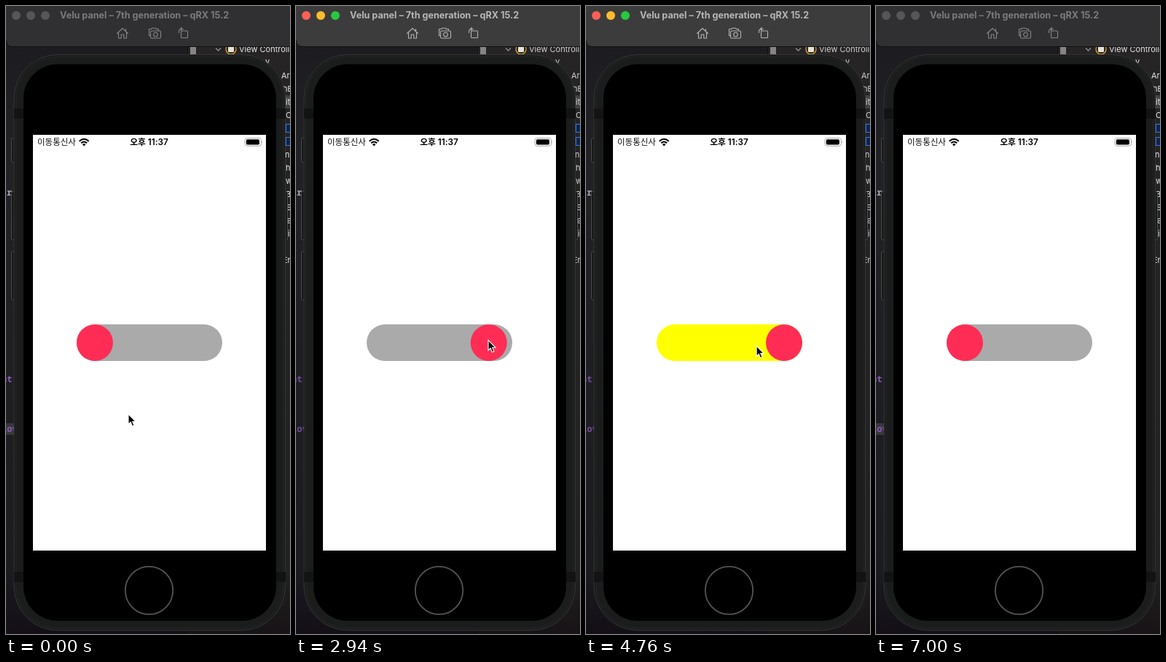
Recreate the animation shown at these times as an HTML page. Size 390 by 858 pixels, loop 7070 ms.

```html
<!DOCTYPE html>
<html lang="ko">
<head>
<meta charset="utf-8">
<style>
  html, body { margin: 0; width: 100%; height: 100%; overflow: hidden; background: #000; }
  svg { display: block; width: 390px; height: 858px; }
  text { font-family: Inter, "Noto Sans CJK KR", sans-serif; }
  .code { font: 600 12px "Noto Sans Mono", monospace; fill: #75499b; }
  #side { font-size: 11px; fill: #d2d1d1; }
  #bar { fill: #3c3c3c; }
  #title { font-size: 12.6px; font-weight: 700; fill: #b7b7b7; }
  #icons { fill: none; stroke: #b2b2b2; stroke-width: 1.1; stroke-linejoin: round; stroke-linecap: round; }
  .idle #bar { fill: #303032; }
  .idle #title { fill: #7b7b7d; }
  .idle #icons { stroke: #858587; }
  .idle #lights circle { fill: #565658; }
  .idle #side { fill: #e8e7e7; }
  .idle .code { fill: #8d5bb6; }
  .idle #caret { fill: #38383e; }
</style>
</head>
<body>
<svg id="stage" viewBox="0 0 390 858">
  <defs>
    <linearGradient id="editor" x2="0" y2="1">
      <stop stop-color="#1b1b1f"/><stop offset=".25" stop-color="#222226"/>
      <stop offset=".9" stop-color="#1b1b20"/><stop offset="1" stop-color="#140f17"/>
    </linearGradient>
    <linearGradient id="panel" x2="0" y2="1">
      <stop stop-color="#262424"/><stop offset=".9" stop-color="#232121"/><stop offset="1" stop-color="#171316"/>
    </linearGradient>
  </defs>

  <!-- windows behind the phone -->
  <rect width="249" height="858" fill="url(#editor)"/>
  <rect x="249" width="141" height="858" fill="url(#panel)"/>
  <path d="M249.5 55V858" stroke="#111"/>
  <rect x="253" y="55" width="8" height="11" fill="#858585"/>
  <rect x="376" y="122" width="14" height="18" fill="#444343"/>
  <path d="M288 57.500l3.500 3.500 3.500-3.500" fill="none" stroke="#929292" stroke-width="1.300"/>
  <circle cx="309" cy="59" r="7" fill="#2c2618" stroke="#d4a136" stroke-width="1.300"/>
  <rect x="305" y="55" width="8" height="8" rx="1" fill="#e5e2db"/>
  <g fill="#10244c" stroke="#3a78db">
    <rect x="384.500" y="161.500" width="10" height="11"/>
    <rect x="384.500" y="179.500" width="10" height="11"/>
  </g>
  <g id="side"></g>
  <rect id="caret" y="570" width="12" height="16" fill="none"/>
  <text class="code" x="1" y="259" style="fill:#aaa0b4">r</text>
  <text class="code" x="-6" y="514">nt</text>
  <text class="code" x="-6" y="582">lov</text>

  <!-- simulator title bar -->
  <path id="bar" d="M0 0H390V55H8Q0 55 0 47Z"/>
  <path d="M390 55.500H8Q.5 55 .5 47" fill="none" stroke="#111"/>
  <g id="lights">
    <circle cx="14" cy="13" r="6" fill="#ff5f57"/>
    <circle cx="34" cy="13" r="6" fill="#febc2e"/>
    <circle cx="54" cy="13" r="6" fill="#28c840"/>
  </g>
  <text id="title" x="74" y="17.300">Velu panel – 7th generation – qRX 15.2</text>
  <g id="icons">
    <path d="M152.500 37.500L160 30.500l7.500 7M154.500 36v8h3.700v-5h3.600v5h3.700v-8M164.500 34v-2.500"/>
    <path d="M198 40.500h-1.500v-9h3l1-1.300h5l1 1.300h3V33"/>
    <rect x="198.500" y="34" width="14" height="10" rx="1.500"/>
    <circle cx="205.500" cy="39" r="2.800"/>
    <rect x="240.500" y="34" width="9" height="9.500" rx="1"/>
    <path d="M237.500 36.500v-2q0-3 3-3h3M241.500 29.500l-2 2 2 2"/>
  </g>

  <!-- phone -->
  <g fill="#17181a" stroke="#4b4b4b">
    <rect x="7.500" y="180.500" width="8" height="33" rx="2"/>
    <rect x="7.500" y="253.500" width="8" height="66" rx="2"/>
    <rect x="7.500" y="335.500" width="8" height="66" rx="2"/>
    <rect x="378.500" y="253.500" width="8" height="66" rx="2"/>
  </g>
  <rect x="11" y="66.500" width="372.500" height="786.500" rx="60" fill="#1b1c1c" stroke="#343535"/>
  <rect x="14" y="69.500" width="366.500" height="780.500" rx="57" fill="none" stroke="#242525"/>
  <path d="M11 140h13v14H11zM371 140h13v14h-13zM11 773h13v14H11zM371 773h13v14h-13z" fill="#121313"/>
  <rect x="24" y="79.500" width="347" height="760.500" rx="47"/>
  <circle cx="196.500" cy="798.500" r="32.700" fill="none" stroke="#545454" stroke-width="1.800"/>
  <rect x="37" y="176" width="320" height="568" fill="#fff"/>

  <!-- status bar -->
  <text x="43" y="190" font-size="11.500" fill="#111">이동통신사</text>
  <g fill="none" stroke="#000" stroke-width="2">
    <path d="M100.700 184.700q6.500-6 13 0M103.200 187.300q4-3.600 8 0"/>
    <path d="M107.200 191.500l-2.300-2.500q2.300-1.900 4.600 0z" fill="#000" stroke="none"/>
  </g>
  <text x="196.500" y="190" font-size="11.800" font-weight="600" text-anchor="middle">오후 11:37</text>
  <rect x="328" y="180.500" width="22.500" height="10.800" rx="3.200" fill="#fff" stroke="#aaa"/>
  <rect x="329.800" y="182.200" width="18.200" height="7.400" rx="1.800"/>
  <path d="M351.700 184.300q1.500 1.600 0 3.200z" fill="#999"/>

  <!-- switch -->
  <rect id="track" x="97" y="435" width="200" height="50" rx="25"/>
  <circle id="knob" cx="122" cy="460" r="25" fill="#ff2d55"/>

  <path id="cursor" d="M0 0V14L3.200 11 5.400 16.400 7.900 15.300 5.700 10.200H10Z" stroke="#fff" stroke-width="1.100"/>
</svg>
<script>
  const $ = id => document.getElementById(id);
  const LOOP = 7070, STEP = 70, SLIDE = 300;

  const labels = [[320, 63, "View Controller"], [356, 80, "y"], [378, 99, "Ar"], [380, 117, "hE"],
    [384, 135, "it"], [384, 153, "C"], [383, 207, "ns"], [384, 225, "h"], [384, 243, "w"],
    [384, 261, "B"], [385, 279, "S"], [386, 297, "a"], [387, 315, "i"], [380, 351, "En"]];
  $("side").innerHTML = labels.map(([x, y, s]) => `<text x="${x}" y="${y}">${s}</text>`).join("");

  // switch taps: start time and resulting state
  const taps = [[900, 1], [2900, 0], [4330, 1], [5480, 0]];

  // pointer stops: time, x, y
  const stops = [[0, 168, 557.5], [560, 133, 464.5], [1470, 133, 464.5], [1870, 265, 456.5],
    [1890, 265, 456.5], [1960, 259, 462], [2380, 259, 462], [2450, 264, 456.5],
    [3430, 264, 456.5], [3850, 123, 465.5], [4480, 123, 465.5], [4900, 273, 464],
    [4970, 273, 464], [5110, 280, 466], [5180, 278.5, 462.5], [5740, 278.5, 462.5],
    [6230, 285, 880], [LOOP, 285, 880]];

  const clamp = v => Math.min(1, Math.max(0, v));
  const ease = v => v * v * (3 - 2 * v);
  const mix = (a, b, k) => a + (b - a) * k;

  function pointer(t) {
    const i = stops.findIndex(s => s[0] > t);
    const [t0, x0, y0] = stops[i - 1], [t1, x1, y1] = stops[i];
    const k = ease((t - t0) / (t1 - t0));
    return [mix(x0, x1, k), mix(y0, y1, k)];
  }

  function draw(now) {
    const t = Math.floor(now % LOOP / STEP) * STEP;
    let on = 0, pos = 0;
    for (const [start, state] of taps) {
      if (t < start) break;
      pos = mix(on, state, ease(clamp((t - start) / SLIDE)));
      on = state;
    }
    $("track").setAttribute("fill", on ? "#ffff00" : "#aaaaaa");
    $("knob").setAttribute("cx", 122 + 150 * pos);
    $("cursor").setAttribute("transform", `translate(${pointer(t)})`);
    $("stage").classList.toggle("idle", t < 770 || t >= 7000);
  }

  const begin = performance.now();
  function tick() {
    draw(performance.now() - begin);
    requestAnimationFrame(tick);
  }
  tick();
</script>
</body>
</html>
```
